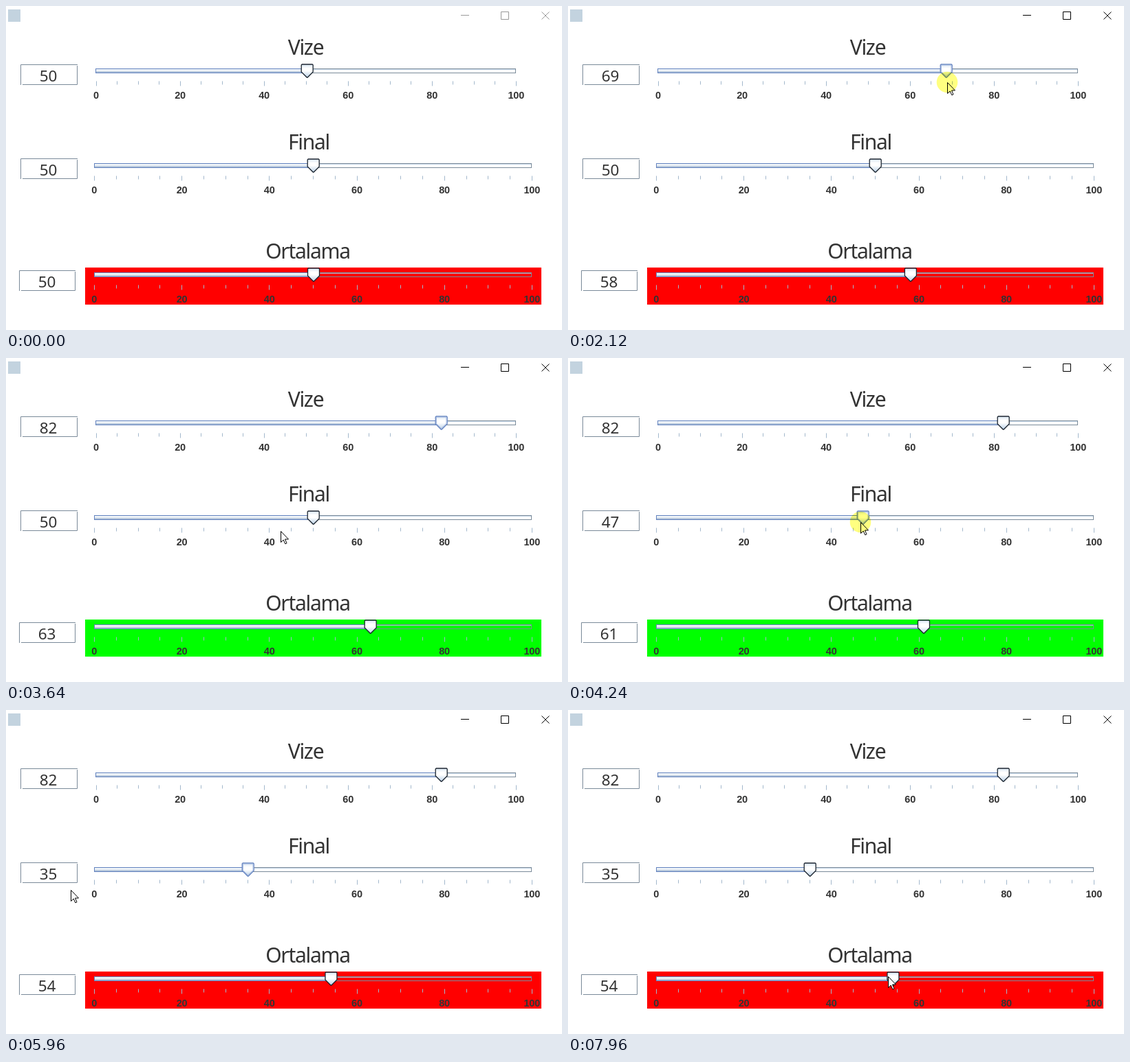
These frames come from a looping animation (808 by 472 pixels, 8 s). An HTML page:

```html
<!DOCTYPE html>
<html lang="tr">
<head>
<meta charset="utf-8">
<title>Ortalama</title>
<style>
  html, body { margin: 0; width: 100%; height: 100%; overflow: hidden; background: #fff; }
  svg { display: block; width: 808px; height: 472px; }
  text { fill: #333; text-anchor: middle; }
  .title { font: 30px "Noto Sans", "Open Sans", sans-serif; letter-spacing: -1.3px; }
  .value { font: 22.5px "Noto Sans", "Open Sans", sans-serif; }
  .label { font: bold 14.5px "Liberation Sans", Arial, sans-serif; letter-spacing: -.2px; }
  .line { fill: none; stroke-width: 1; }
  .halo { fill: #ffff80; mix-blend-mode: multiply; }
</style>
</head>
<body>
<svg id="stage" viewBox="0 0 808 472">
  <defs>
    <linearGradient id="knob" x1="0" y1="0" x2="0" y2="1">
      <stop offset="0" stop-color="#d6e4f1"/>
      <stop offset=".3" stop-color="#fff"/>
      <stop offset=".5" stop-color="#fff"/>
      <stop offset="1" stop-color="#b8cfe5"/>
    </linearGradient>
    <linearGradient id="bar" x1="0" y1="0" x2="0" y2="1">
      <stop offset="0" stop-color="#d2e2ef"/>
      <stop offset=".3" stop-color="#fff"/>
      <stop offset="1" stop-color="#8fa9c8"/>
    </linearGradient>
  </defs>
</svg>
<script>
const LOOP = 8000, STEP = 40;
const stage = document.getElementById('stage');

function set(el, attrs) {
  for (const k in attrs) el.setAttribute(k, attrs[k]);
}
function add(tag, attrs, parent = stage) {
  const el = document.createElementNS('http://www.w3.org/2000/svg', tag);
  set(el, attrs);
  parent.appendChild(el);
  return el;
}
function write(cls, x, y, s) {
  const el = add('text', { class: cls, x, y });
  el.textContent = s;
  return el;
}

// Title bar
add('rect', { x: 3, y: 5, width: 18, height: 18, fill: '#c3d3df' });
const buttons = add('path', {
  class: 'line',
  d: 'M661 13.5H673M719.5 8.5h11v11h-11zM778.5 8.5l11 11M789.5 8.5l-11 11'
});

const panel = add('rect', { x: 115, y: 381, width: 663, height: 54 });

function makeSlider({ name, titleX, titleY, x0, x1, track, box }) {
  const at = v => x0 + (x1 - x0) * v / 100;
  const left = Math.floor(x0);
  write('title', titleX, titleY, name);

  const [bx, by, bw] = box;
  add('path', {
    class: 'line', stroke: '#7a8a99',
    d: `M${bx + .5} ${by + 30}V${by + .5}H${bx + bw}M${bx + bw - .5} ${by + 2}V${by + 29.5}H${bx + 3}`
  });
  const value = write('value', bx + 40.5, by + 25, '');

  add('rect', { x: left + 1, y: track + 1, width: x1 - left - 2, height: 1, fill: '#b8cfe5', opacity: .8 });
  add('rect', {
    class: 'line', stroke: '#7a8a99', x: left + .5, y: track + .5, width: x1 - left - 1, height: 6
  });
  const fill = add('rect', {
    x: left + .5, y: track + .5, height: 6, fill: 'url(#bar)', stroke: '#6382bf'
  });
  for (let v = 0; v <= 100; v += 5) {
    const major = v % 20 === 0;
    add('rect', {
      x: Math.round(at(v)), y: track + 18.5, width: 1, height: major ? 7 : 5, fill: '#a3b8cc'
    });
    if (major) write('label', at(v) + .3, track + 44, v);
  }
  const thumb = add('g', {});
  const shape = add('path', {
    d: 'M-7.5 .5H7.5L8.5 1.5V11.5L.5 19.5H-.5L-8.5 11.5V1.5Z',
    fill: 'url(#knob)', 'stroke-width': 1.3
  }, thumb);
  const ring = add('path', {
    class: 'line', stroke: '#a3b8e0', d: 'M-7.3 1.6H7.3V11L0 18L-7.3 11Z'
  }, thumb);

  return {
    box,
    show(x, n, active) {
      value.textContent = n;
      set(fill, { width: x - left });
      set(thumb, { transform: `translate(${x} ${track - 6.5})` });
      set(shape, { stroke: active ? '#6382bf' : '#1c2530' });
      set(ring, { opacity: active ? 1 : 0 });
    }
  };
}

const vize = makeSlider({
  name: 'Vize', titleX: 435.5, titleY: 71, x0: 130.7, x1: 741, track: 91, box: [21, 85, 83]
});
const final = makeSlider({
  name: 'Final', titleX: 440, titleY: 209, x0: 128, x1: 764, track: 229, box: [21, 222, 83]
});
const mean = makeSlider({
  name: 'Ortalama', titleX: 438.5, titleY: 368, x0: 128, x1: 764, track: 388, box: [19, 385, 82]
});

// Pointer
const arrow = add('path', {
  d: 'M.5 .5V16.5L4.2 13L6.8 18.8L9 17.8L6.5 12H11.5Z',
  fill: '#fff', stroke: '#000', 'stroke-linejoin': 'round'
});
const beam = add('path', {
  class: 'line', stroke: '#000', d: 'M-3.5 -8.5H-1L.5 -7.5L2 -8.5H4.5M.5 -7.5V7.5M-3.5 8.5H-1L.5 7.5L2 8.5H4.5'
});
const halo = add('circle', { class: 'halo', r: 15.3 });

// Each move: begin, end, then the place it reaches
const home = [620, 400];
const moves = [
  [520, 1440, 439, 95],
  [1600, 2120, 551, 111], [2120, 2440, 576, 115], [2440, 2720, 644, 123],
  [3000, 3120, 634, 123], [3120, 3640, 399, 252], [3640, 3920, 443, 238],
  [4120, 4720, 327, 245], [5040, 5440, 348, 245],
  [5720, 5960, 94, 262], [5960, 6440, 84, 242],
  [6720, 6960, 58, 393], [7120, 7880, 442, 399], [7920, 7960, 465, 388]
];

const clamp = (t, a, b) => Math.min(Math.max(t, a), b);
const within = (t, a, b) => t >= a && t < b;
const ease = k => (k + k * k * (3 - 2 * k)) / 2;

function pointer(t) {
  let [x, y] = home;
  for (const [a, b, u, v] of moves) {
    const k = ease(clamp((t - a) / (b - a), 0, 1));
    x += (u - x) * k;
    y += (v - y) * k;
  }
  return [Math.round(x), Math.round(y)];
}
const inBox = (x, y, [bx, by, bw]) => x >= bx && x < bx + bw && y >= by && y < by + 30;
const visible = on => on ? 'visible' : 'hidden';

function draw(t) {
  const [x, y] = pointer(t);
  // Each thumb follows the pointer only during its own drag
  const vx = pointer(clamp(t, 1600, 3120))[0] - 1.3;
  const fx = pointer(clamp(t, 4120, 5440))[0] + 3.7;
  const v = (vx - 131) / 6.11, f = Math.round((fx - 128) / 6.36);
  const avg = Math.round(.4 * Math.round(v) + .6 * f);
  const lead = Math.round(.4 * Math.ceil(v) + .6 * f);

  vize.show(vx, Math.round(v), within(t, 1600, 4120));
  final.show(fx, f, within(t, 4120, 6440));
  mean.show(129 + 6.36 * lead, avg, false);
  set(panel, { fill: avg >= 60 ? '#0f0' : '#f00' });
  set(buttons, { stroke: t < 1600 ? '#999' : '#000' });

  const down = within(t, 1600, 3160) || within(t, 4120, 5720) || within(t, 6440, 6560);
  const typing = [vize, final, mean].some(s => inBox(x, y, s.box));
  const seen = t >= 520;
  const transform = `translate(${x} ${y})`;
  set(halo, { transform, visibility: visible(down) });
  set(arrow, { transform, visibility: visible(seen && !typing) });
  set(beam, { transform, visibility: visible(seen && typing) });
}

const start = performance.now();
function tick(now) {
  const t = Math.max(0, now - start) % LOOP;
  draw(Math.floor(t / STEP) * STEP);
  requestAnimationFrame(tick);
}
draw(0);
requestAnimationFrame(tick);
</script>
</body>
</html>
```
